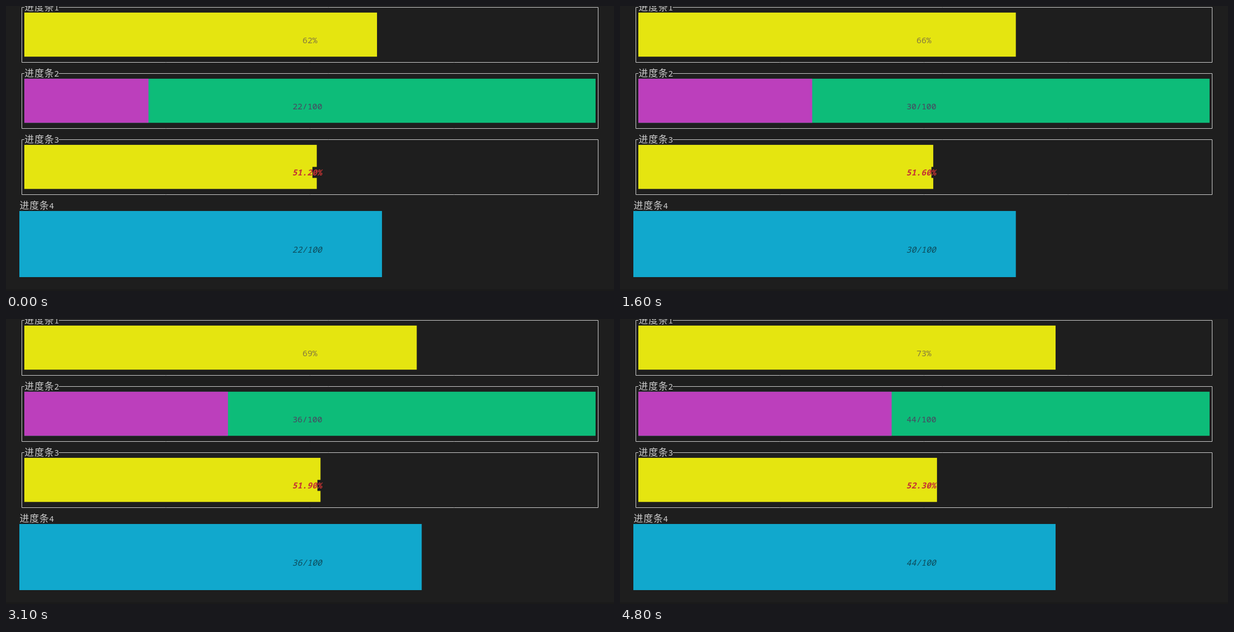
Write an HTML page with a canvas that moves like this. It is 1093x513 px and loops after 4900 ms.

```html
<!DOCTYPE html>
<html lang="zh">
<head>
<meta charset="utf-8">
<style>
html, body { margin: 0; width: 100%; height: 100%; overflow: hidden; background: #1e1e1e; }
canvas { display: block; }
</style>
</head>
<body>
<canvas id="stage" width="1093" height="513"></canvas>
<script>
const ctx = document.getElementById('stage').getContext('2d');
const LOOP = 4900;
const STEPS = [400, 600, 1100, 1600, 2000, 2500, 3100, 3400, 3800, 4300, 4800];
const BG = '#1e1e1e', FG = '#cccccc', YELLOW = '#e5e510';

// Terminal grid: the first column starts at x = 24, row 0 is cut by the top edge
const CW = 8.93, RH = 19.84;
const colX = c => 24 + c * CW;
const rowY = r => -8 + r * RH;

function cells(col, row, w, h, color) {
  ctx.fillStyle = color;
  ctx.fillRect(colX(col), rowY(row), w * CW, h * RH);
}

function text(str, col, row, color, style = '') {
  const slant = style.includes('italic') ? -0.7 : 0;
  ctx.fillStyle = color;
  for (const ch of str) {
    const wide = ch > '\u2e80';
    ctx.font = wide
      ? '300 17px "Noto Sans CJK SC", "Noto Sans CJK", sans-serif'
      : style + ' 14.9px "Noto Sans Mono", monospace';
    ctx.fillText(ch, colX(col) + (wide ? 0.4 : slant), rowY(row) + 15.7);
    col += wide ? 2 : 1;
  }
}

function frame(title, row) {
  const x = 28.5, y = Math.round(rowY(row + 0.5)) + 0.5;
  const bottom = Math.round(rowY(row + 5.5)) + 0.5;
  ctx.strokeStyle = FG;
  ctx.lineWidth = 1;
  ctx.beginPath();
  ctx.moveTo(33, y);
  ctx.lineTo(x, y);
  ctx.lineTo(x, bottom);
  ctx.lineTo(1064.5, bottom);
  ctx.lineTo(1064.5, y);
  ctx.lineTo(95, y);
  ctx.stroke();
  text(title, 1, row, FG);
}

function draw(now) {
  const t = now % LOOP;
  const k = STEPS.filter(s => s <= t).length;
  const percent = 62 + k, count = 22 + 2 * k, fine = 51.2 + k / 10;

  ctx.fillStyle = BG;
  ctx.fillRect(0, 0, 1093, 513);
  ctx.fillStyle = '#1a1a1a';
  ctx.fillRect(0, 510, 1093, 3);

  frame('进度条1', 0);
  cells(1, 1, Math.round(percent * 1.15), 4, YELLOW);
  text(percent + '%', 57, 3, '#84793f');

  frame('进度条2', 6);
  cells(1, 7, 115, 4, '#0dbc79');
  cells(1, 7, Math.round(count * 1.15), 4, '#bc3fbc');
  text(count + '/100', 55, 9, '#4b4560');

  // Fills in eighths of a cell; text hides a partly filled cell behind it
  frame('进度条3', 12);
  const fill = Math.round(fine * 1.15 * 8) / 8, full = Math.floor(fill);
  cells(1, 13, fill, 4, YELLOW);
  if (full < 60) cells(1 + full, 15, 1, 1, BG);
  text(fine.toFixed(2) + '%', 55, 15, '#c53333', 'italic bold');

  text('进度条4', 0, 18, FG);
  cells(0, 19, Math.round(percent * 1.17), 6, '#11a8cd');
  text(count + '/100', 55, 22, '#0e4a5a', 'italic');
}

const start = performance.now();
function tick() {
  draw(performance.now() - start);
  requestAnimationFrame(tick);
}
tick();
</script>
</body>
</html>
```
